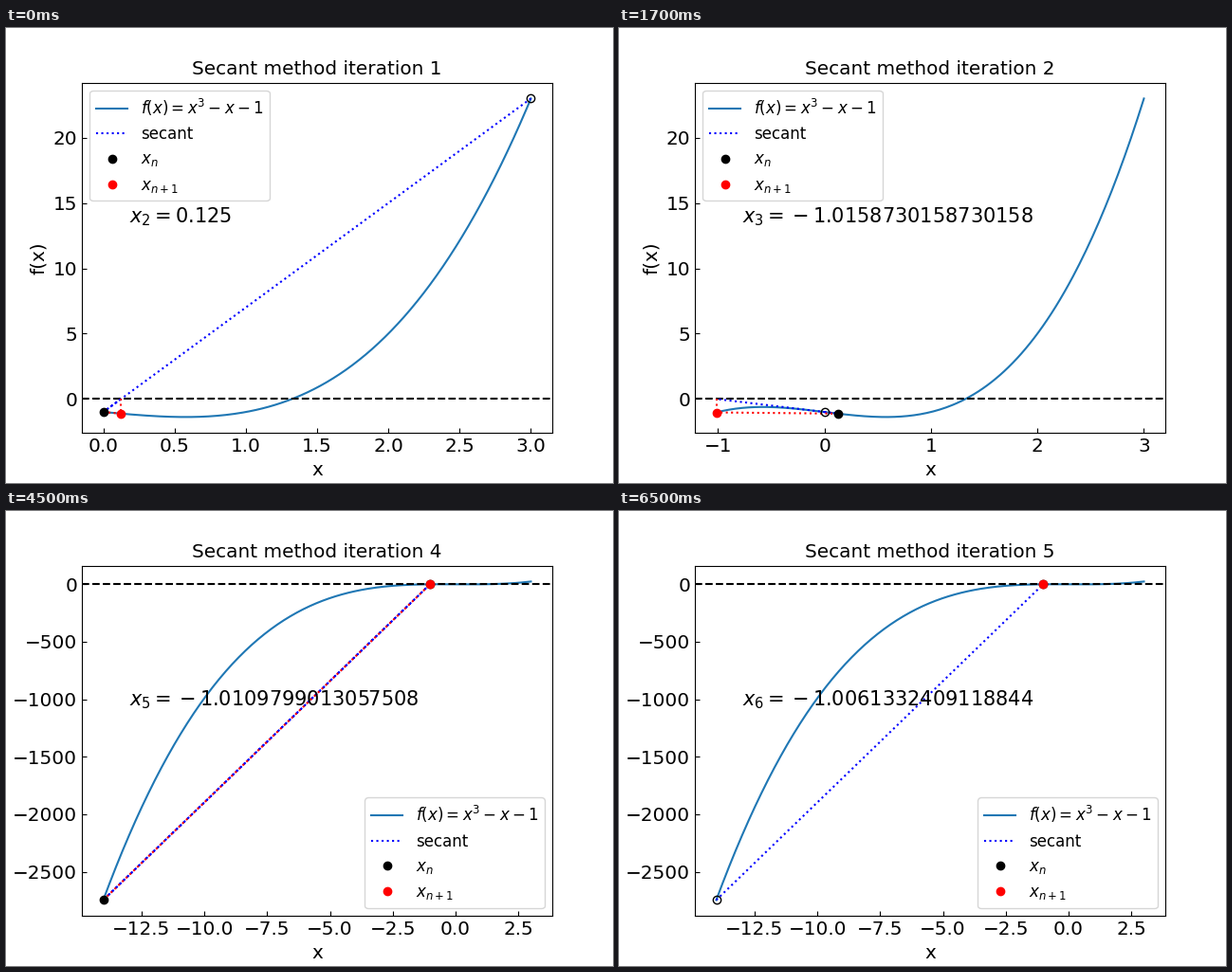
Write a matplotlib script that moves like this. It is 640 by 480 pixels and loops after 8 s.

```python
import numpy as np
import matplotlib.pyplot as plt
from matplotlib.animation import FuncAnimation

plt.rcParams.update({
    "font.family": "DejaVu Sans",
    "font.size": 12,
    "axes.labelsize": "large",
    "xtick.labelsize": "large",
    "ytick.labelsize": "large",
    "xtick.direction": "in",
    "ytick.direction": "in",
})

INTERVAL = 500
STEP_FRAMES = [1, 4, 4, 4, 3]  # frames each iteration stays on screen
SCHEDULE = np.repeat(np.arange(1, 6), STEP_FRAMES)


def f(x):
    return x**3 - x - 1


def secant_points(count):
    points = [3.0, 0.0]
    for _ in range(count):
        a, b = points[-2:]
        points.append(b - f(b) * (b - a) / (f(b) - f(a)))
    return points


POINTS = secant_points(5)
fig, ax = plt.subplots(figsize=(6.4, 4.8), dpi=100)


def draw_iteration(n):
    previous, current, new = POINTS[n - 1:n + 2]
    seen = POINTS[:n + 2]
    x = np.linspace(min(seen), max(seen), 200)

    ax.clear()
    ax.plot(x, f(x), label="$f(x) = x^3 - x - 1$")
    ax.axhline(0, color="black", linestyle="--")
    ax.plot([previous, current, new], [f(previous), f(current), 0],
            "b:", label="secant")
    ax.plot([current, new], [f(current), f(new)], "r:")
    ax.plot([new, new], [0, f(new)], "r:")
    ax.plot(previous, f(previous), "ko", fillstyle="none")
    ax.plot(current, f(current), "ko", label="$x_n$")
    ax.plot(new, f(new), "ro", label="$x_{n+1}$")

    # The empty group keeps full spacing around a leading minus sign.
    ax.text(0.1, 0.6, f"$x_{n + 1} = {{}}{new}$", fontsize=15,
            transform=ax.transAxes)
    ax.set(xlabel="x", ylabel="f(x)", title=f"Secant method iteration {n}")
    ax.legend(loc="upper left" if n < 3 else "lower right")


def update(frame):
    draw_iteration(SCHEDULE[frame])


animation = FuncAnimation(fig, update, frames=len(SCHEDULE), interval=INTERVAL,
                          init_func=lambda: update(0), repeat=True,
                          repeat_delay=0)
plt.show()
```
